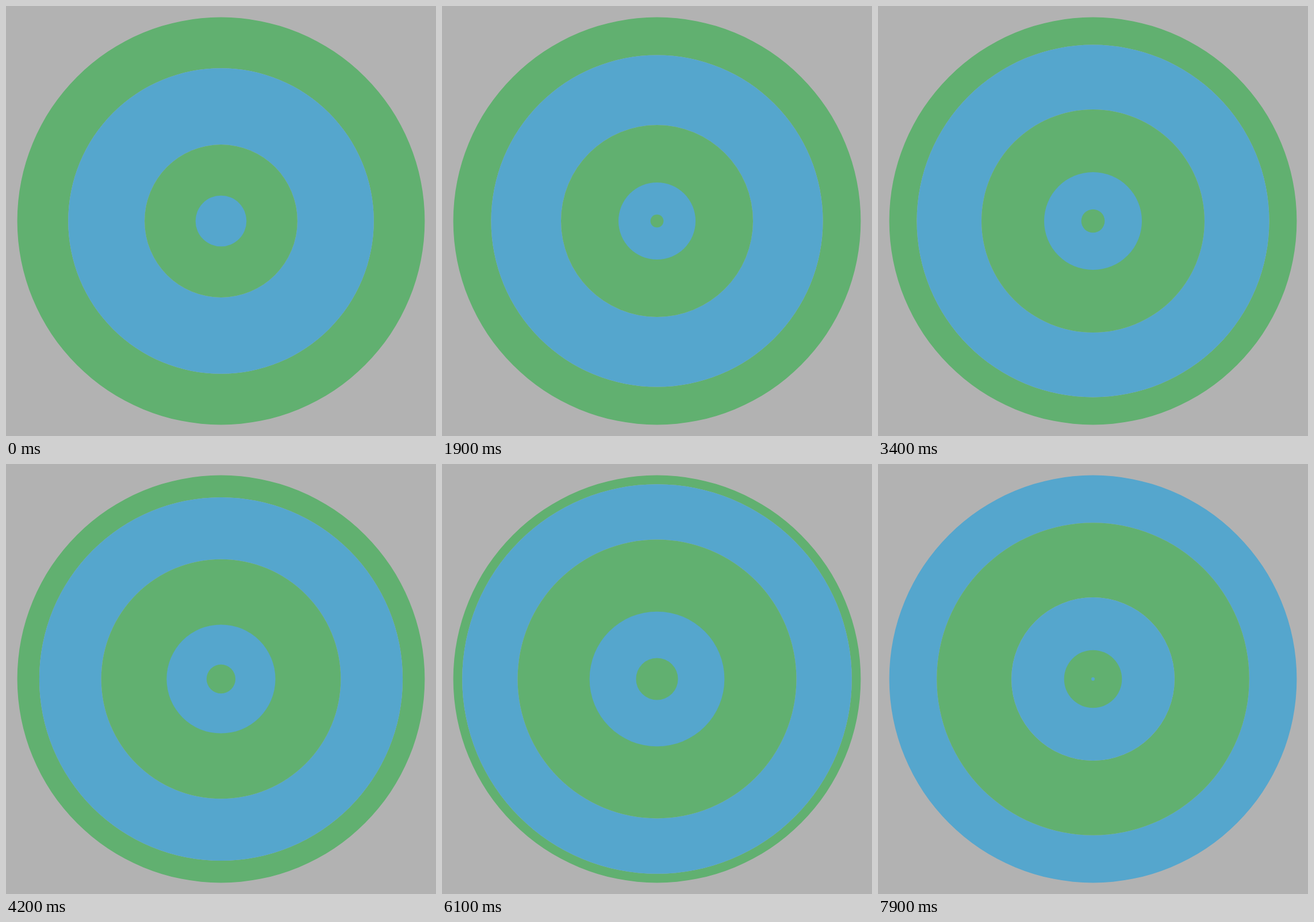
Recreate the animation shown at these times as an HTML page with a canvas. Size 748 px wide and 748 px high, loop 8 s.

```html
<!DOCTYPE html>
<html>
<head>
<meta charset="utf-8">
<style>
  html, body { margin: 0; width: 100%; height: 100%; overflow: hidden; background: #b2b2b2; }
  canvas { display: block; }
</style>
</head>
<body>
<canvas id="stage" width="748" height="748"></canvas>
<script>
const ctx = document.getElementById('stage').getContext('2d');
const SIZE = 748, MID = SIZE / 2, RADIUS = 354.4;
const LOOP = 8000, STEP = 100, PERIOD = 7400;
const STOPS = [0, 0.125, 0.375, 0.75, 1];
const GREEN = '#61b070', BLUE = '#55a6cd';

// Disc, or ring when a hole is given.
function ring(outer, hole, color) {
  ctx.beginPath();
  ctx.arc(MID, MID, outer, 0, Math.PI * 2);
  if (hole > 0) {
    ctx.moveTo(MID + hole, MID);
    ctx.arc(MID, MID, hole, 0, Math.PI * 2, true);
  }
  ctx.fillStyle = color;
  ctx.fill();
}

function draw(time) {
  const t = Math.floor((time % LOOP) / STEP) * STEP;
  const cycle = Math.floor(t / PERIOD);
  const phase = (t % PERIOD) / PERIOD;
  const colors = cycle % 2 ? [BLUE, GREEN] : [GREEN, BLUE];
  // Every edge glides outward to the next stop during one period.
  const edge = i => RADIUS * (STOPS[i] + (STOPS[i + 1] - STOPS[i]) * phase);

  ctx.fillStyle = '#b2b2b2';
  ctx.fillRect(0, 0, SIZE, SIZE);
  ring(RADIUS, edge(3), colors[0]);
  ring(edge(3), edge(2), colors[1]);
  ring(edge(2), 0, colors[0]);
  ring(edge(1), 0, colors[1]);
  if (phase > 0) ring(edge(0), 0, colors[0]);
}

let start = null;
function tick(now) {
  if (start === null) start = now;
  draw(now - start);
  requestAnimationFrame(tick);
}
draw(0);
requestAnimationFrame(tick);
</script>
</body>
</html>
```
